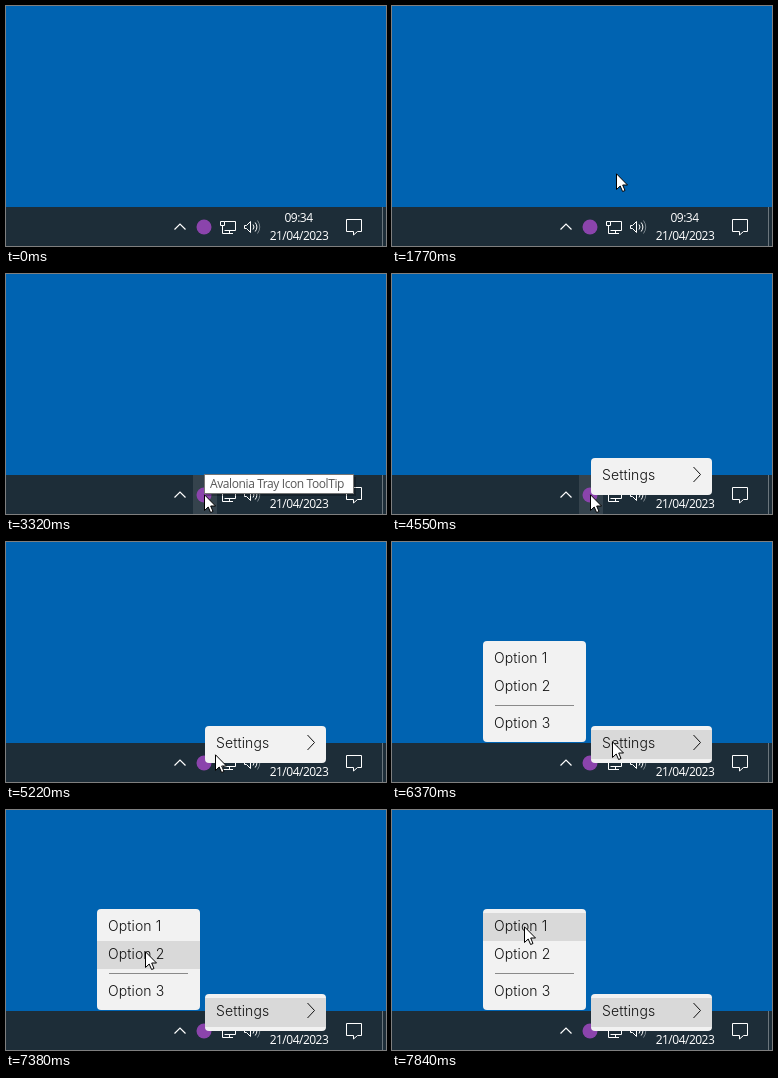
An HTML page that plays this animation: 380 by 240 pixels, repeating every 8000 ms.

```html
<!DOCTYPE html>
<html lang="en">
<head>
<meta charset="utf-8">
<title>Tray icon menu</title>
<style>
@property --x { syntax: '<integer>'; inherits: false; initial-value: -40; }
@property --y { syntax: '<integer>'; inherits: false; initial-value: -40; }

html, body { margin: 0; width: 100%; height: 100%; overflow: hidden; background: #0063b1; }
svg { display: block; width: 380px; height: 240px; }

.bar, .tip-text { font: 12px "Open Sans", "Noto Sans", sans-serif; letter-spacing: -.5px; }
.bar { font-weight: 500; fill: #fff; text-anchor: middle; }
.tip-text { letter-spacing: -.4px; fill: #575757; }
.menu text { font: 300 14px Inter, sans-serif; letter-spacing: .1px; fill: #111; }
.line { fill: none; stroke: #fff; }
.panel { fill: #f2f2f2; }
.hot { fill: #d9d9d9; }

.anim { animation: 8s step-end infinite; opacity: 0; }
.glow { animation-name: glow; }
.tip { animation-name: tip; }
.root { animation-name: root; }
.sub { animation-name: sub; }
.hot-root { animation-name: hot-root; }
.hot-1 { animation-name: hot-1; }
.hot-2 { animation-name: hot-2; }
.hot-3 { animation-name: hot-3; }

@keyframes glow { 0% { opacity: 0 } 31% { opacity: 1 } 57.625%, 100% { opacity: 0 } }
@keyframes tip {
  0% { opacity: 0 } 39.875% { opacity: .35 } 40.75% { opacity: .7 }
  41.5% { opacity: 1 } 54.625%, 100% { opacity: 0 }
}
@keyframes root { 0% { opacity: 0 } 56.875%, 100% { opacity: 1 } }
@keyframes sub { 0% { opacity: 0 } 71.125%, 100% { opacity: 1 } }
@keyframes hot-root { 0% { opacity: 0 } 66%, 100% { opacity: 1 } }
@keyframes hot-3 { 0% { opacity: 0 } 83.375% { opacity: 1 } 88.5%, 100% { opacity: 0 } }
@keyframes hot-2 { 0% { opacity: 0 } 88.5% { opacity: 1 } 94%, 100% { opacity: 0 } }
@keyframes hot-1 { 0% { opacity: 0 } 94%, 100% { opacity: 1 } }

.cursor {
  transform: translate(calc(var(--x) * 1px), calc(var(--y) * 1px));
  animation: move 8s step-end infinite;
}
@keyframes move {
  0% { --x: -40; --y: -40 }
  /* enter from the top and swing towards the tray */
  16.375% { --x: 124; --y: 1; animation-timing-function: steps(2) }
  17.8125% { --x: 165; --y: 50; animation-timing-function: steps(2) }
  19.25% { --x: 205; --y: 108; animation-timing-function: steps(2) }
  20.6875% { --x: 228; --y: 147 }
  21.4% { --x: 230; --y: 158 }
  22.125% { --x: 224; --y: 167; animation-timing-function: steps(5) }
  25.75% { --x: 213; --y: 195 }
  26.5% { --x: 211; --y: 198 }
  27.125% { --x: 210; --y: 200 }
  /* settle on the icon */
  30.25% { --x: 209; --y: 202; animation-timing-function: steps(5) }
  34% { --x: 201; --y: 215; animation-timing-function: steps(5) }
  37.75% { --x: 198; --y: 220 }
  /* into the menu */
  63.75% { --x: 200; --y: 218; animation-timing-function: steps(2) }
  65.25% { --x: 209; --y: 212; animation-timing-function: steps(3) }
  67.5% { --x: 220; --y: 204; animation-timing-function: steps(3) }
  69.75% { --x: 223; --y: 202 }
  74.25% { --x: 223; --y: 201 }
  /* across the options */
  79.625% { --x: 220; --y: 199; animation-timing-function: steps(4) }
  82.625% { --x: 192; --y: 187; animation-timing-function: steps(6) }
  87.125% { --x: 147; --y: 164; animation-timing-function: steps(3) }
  89.25% { --x: 142; --y: 152 }
  90% { --x: 141; --y: 149; animation-timing-function: steps(5) }
  94% { --x: 135; --y: 128; animation-timing-function: steps(5) }
  98%, 100% { --x: 132; --y: 116 }
}
</style>
</head>
<body>
<svg viewBox="0 0 380 240">
  <rect width="380" height="240" fill="#0063b1"/>
  <rect y="201" width="380" height="39" fill="#1d2d38"/>
  <rect class="anim glow" x="187" y="201" width="24" height="39" fill="#35434d"/>

  <g class="line">
    <path d="M168.5 223.5l5.5-5.5 5.5 5.5" stroke-width="1.2"/>
    <path d="M218.5 215.5h11v9h-11M223.5 224.5v3M219 227.5h8"/>
    <path d="M214.5 215.5h4v4h-4zM216.5 219.5v8h3"/>
    <path d="M238.5 219.5h2l4-4v11l-4-4h-2z"/>
    <path d="M247 218.5q2 2.5 0 5M249.2 216.5q3.4 4.500 0 9"/>
    <path d="M251.5 214.5q4.5 6.5 0 13" stroke="#7c878e"/>
    <path d="M340.5 213.5h15v12h-4l-4 3.500v-3.500h-7z"/>
    <path d="M376.5 201v39" stroke="#6b767d"/>
  </g>
  <circle cx="198" cy="221" r="7.5" fill="#8b44ac"/>

  <g class="bar">
    <text x="292.5" y="216">09:34</text>
    <text x="293" y="234">21/04/2023</text>
  </g>

  <g class="anim tip">
    <rect x="200" y="203" width="150" height="19" opacity=".25"/>
    <rect x="198.5" y="200.5" width="149" height="19" fill="#fff" stroke="#767676"/>
    <text class="tip-text" x="204" y="214">Avalonia Tray Icon ToolTip</text>
  </g>

  <g class="menu">
    <g class="anim root">
      <rect class="panel" x="199" y="184" width="121" height="37" rx="4"/>
      <rect class="hot anim hot-root" x="199" y="188" width="121" height="29"/>
      <text x="210" y="206">Settings</text>
      <path d="M301.5 193l7 7.5-7 7.5" fill="none" stroke="#111"/>
    </g>
    <g class="anim sub">
      <rect class="panel" x="91" y="99" width="103" height="101" rx="4"/>
      <rect class="hot anim hot-1" x="91" y="103" width="103" height="28"/>
      <rect class="hot anim hot-2" x="91" y="131" width="103" height="28"/>
      <rect class="hot anim hot-3" x="91" y="168" width="103" height="28"/>
      <path d="M103 163.5h79" stroke="#8a8a8a"/>
      <text x="102" y="121">Option 1</text>
      <text x="102" y="149">Option 2</text>
      <text x="102" y="186">Option 3</text>
    </g>
  </g>

  <path class="cursor" d="M.5.8V16.5L4.2 13 6.6 18.5 9 17.5 6.7 12H11.5z" fill="#fff" stroke="#000"/>
</svg>
</body>
</html>
```
